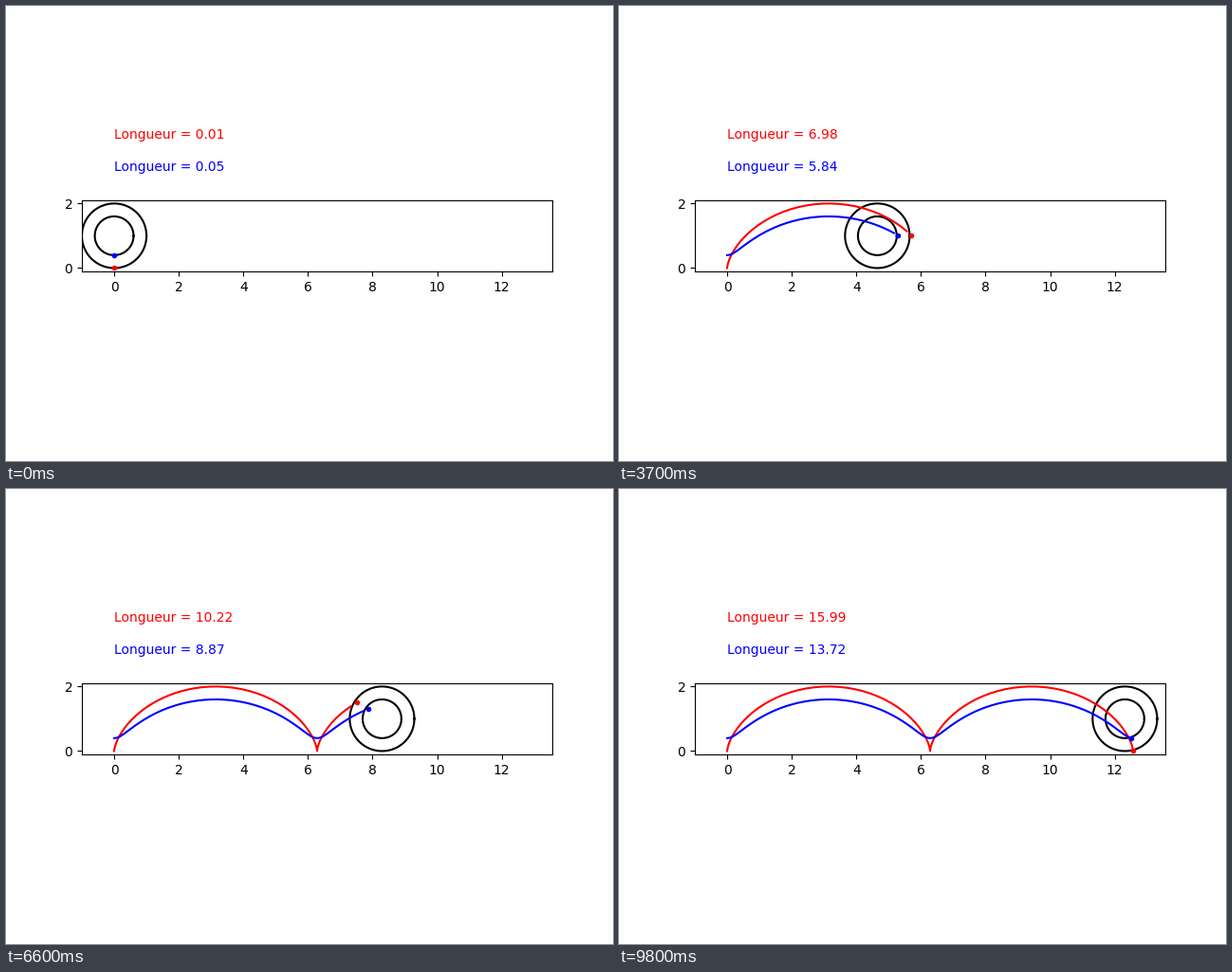
Recreate the animation shown at these times as a matplotlib script. Size 640 px wide and 480 px high, loop 9900 ms.

```python
import numpy as np
import matplotlib.pyplot as plt
from matplotlib.animation import FuncAnimation

POINTS = 100
FRAMES = POINTS - 1
END = 4 * np.pi          # two full turns of a unit wheel

t = np.linspace(0, END, POINTS)
theta = np.linspace(0, 2 * np.pi, 100)

fig, ax = plt.subplots(figsize=(6.4, 4.8), dpi=100)
ax.set_aspect("equal")
ax.set_xlim(-1, END + 1)
ax.set_ylim(-0.1, 2.1)
ax.set_xticks(range(0, 13, 2))
ax.set_yticks([0, 2])


class Tracer:
    """A point at a given radius on the wheel, with its path and length."""

    def __init__(self, radius, color, text_y):
        self.radius = radius
        self.x = t - radius * np.sin(t)
        self.y = 1 - radius * np.cos(t)
        self.length = np.cumsum(np.hypot(np.diff(self.x), np.diff(self.y)))
        self.circle, = ax.plot([], [], "k", zorder=2)
        self.path, = ax.plot([], [], color=color, zorder=2.1)
        self.dot, = ax.plot([], [], ".", color=color, zorder=2.2)
        self.label = ax.text(0, text_y, "", color=color)

    def update(self, i):
        center = END * i / POINTS
        self.circle.set_data(center + self.radius * np.cos(theta),
                             1 + self.radius * np.sin(theta))
        self.path.set_data(self.x[:i], self.y[:i])
        self.dot.set_data([self.x[i]], [self.y[i]])
        self.label.set_text(f"Longueur = {self.length[i]:.2f}")
        return self.circle, self.path, self.dot, self.label


tracers = [Tracer(1.0, "red", 4), Tracer(0.6, "blue", 3)]


def update(i):
    return [artist for tracer in tracers for artist in tracer.update(i)]


anim = FuncAnimation(fig, update, frames=FRAMES, interval=100,
                     repeat=True, repeat_delay=0)
plt.show()
```
